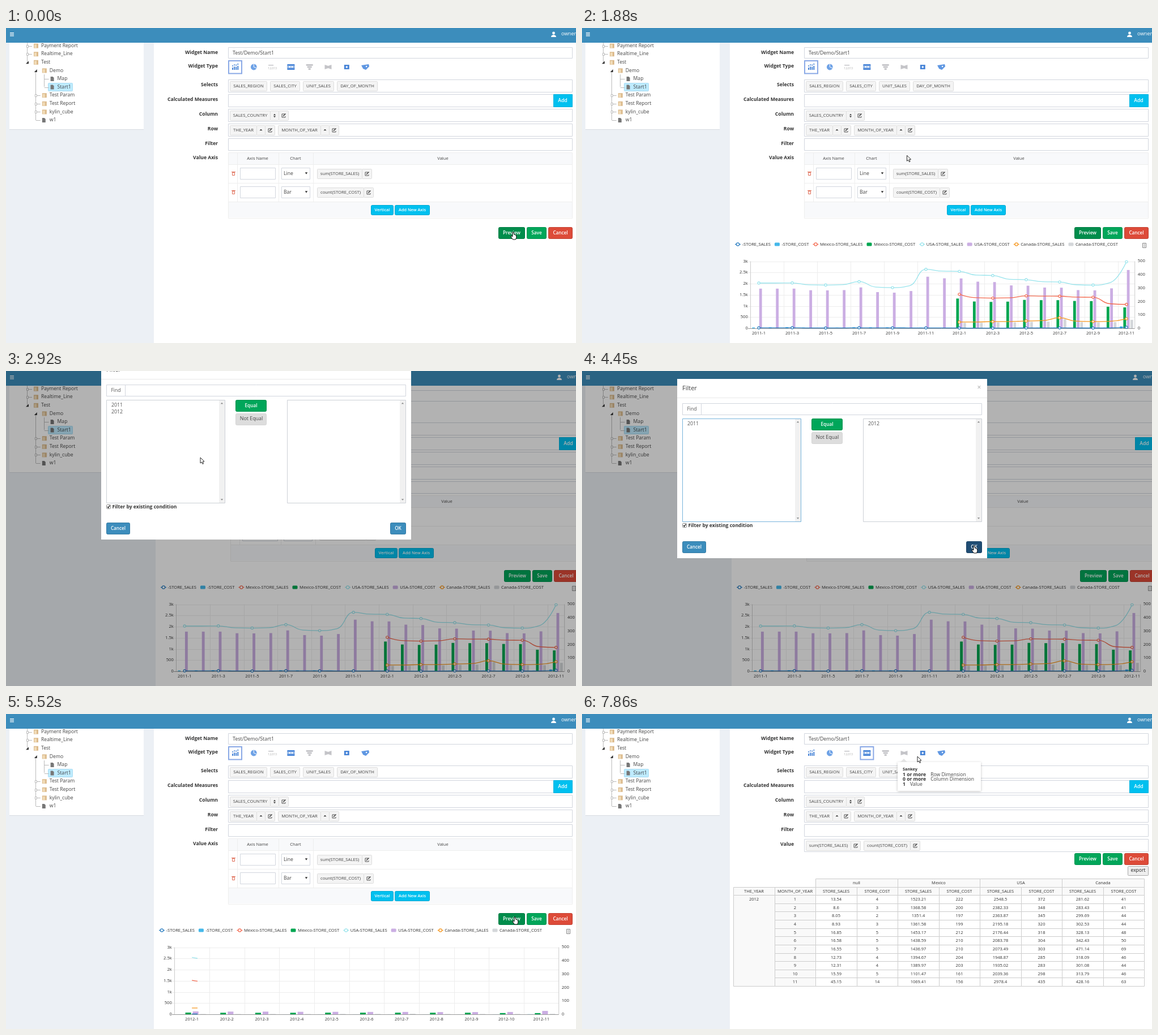
An HTML page with a canvas that plays this animation: 1006 by 557 pixels, repeating every 8000 ms.

```html
<!DOCTYPE html>
<html lang="en">
<head>
<meta charset="utf-8">
<title>Widget editor</title>
<style>
html, body { margin: 0; width: 100%; height: 100%; overflow: hidden; }
canvas { display: block; }
</style>
</head>
<body>
<canvas id="stage" width="1006" height="557"></canvas>
<script>
const g = document.getElementById('stage').getContext('2d');
const GREEN = '#00a65a', RED = '#dd4b39', CYAN = '#00c0ef', BLUE = '#3c8dbc', ICON = '#4a86d8', PALE = '#c4c4c8';

// The picture advances in beats; everything below is timed by beat number.
const BEAT = 261, LEAD = 520;
const CHART = 1, WIDE = 8, MODAL = 9, PICKED = 12, CONFIRM = 15, CLOSED = 16, NARROW = 17, REDRAW = 19, BLUR = 26, TABLE = 27, TIP = 28;

// beat, x, y
const PATH = [[2, 896, 367], [6, 466, 178], [8, 466, 178], [MODAL, 343, 153], [11, 200, 106], [CONFIRM, 693, 315],
  [NARROW, 899, 365], [21, 899, 365], [24, 502, 73], [TABLE, 502, 73], [TIP, 592, 75]];

// sales of every second month up to 2012-11; cost is a share of sales
const GROUPS = [
  { name: 'null', line: '#2a7dc0', bar: '#45b8ea', share: .3, keys: [20, 26, 14, 24, 20, 18, 13.54, 8.05, 16.85, 16.55, 12.31, 45.15] },
  { name: 'Mexico', line: '#f3694f', bar: '#00a651', share: .146, keys: [1523.21, 1351.4, 1453.17, 1436.97, 1389.97, 1069.41] },
  { name: 'USA', line: '#98e4ec', bar: '#cbaee3', share: .146,
    keys: [2025, 2030, 1935, 2090, 1820, 2640, 2548.5, 2363.87, 2176.44, 2073.49, 1935.02, 2978.4] },
  { name: 'Canada', line: '#f5961d', bar: '#d4d7da', share: .146, keys: [281.62, 299.69, 328.13, 471.14, 301.08, 428.16] }];
const MONTHS = 23;

// months between two keys stay near the lower one
function sales(keys, month) {
  const k = (month - MONTHS + keys.length * 2 - 1) / 2;
  if (k < 0) return null;
  const a = keys[Math.floor(k)], b = keys[Math.ceil(k)];
  return +(Math.min(a, b) * .9 + Math.max(a, b) * .1).toFixed(2);
}
const ROWS = Array.from({ length: MONTHS }, (_, i) => GROUPS.map(({ keys, share }) => {
  const s = sales(keys, i);
  return { sales: s, cost: Math.round(s * share) };
}));
const Y2012 = ROWS.slice(12);

const clamp = (v, a, b) => Math.max(a, Math.min(b, v));

function measure(s, size, weight = 400) {
  g.font = `${weight} ${size}px "Open Sans", "Noto Sans", sans-serif`;
  return g.measureText(s).width;
}
function text(s, x, y, size = 8.6, color = '#444', align = 'left', weight = 400) {
  const w = measure(s, size, weight);
  g.fillStyle = color;
  g.textAlign = align;
  g.textBaseline = 'middle';
  g.fillText(s, x, y);
  return w;
}
function rect(x, y, w, h, fill) {
  g.fillStyle = fill;
  g.fillRect(x, y, w, h);
}
function box(x, y, w, h, fill = '#fff', stroke = '#d2d6de', r = 0) {
  g.beginPath();
  g.roundRect(x + .5, y + .5, w - 1, h - 1, r);
  g.fillStyle = fill;
  g.fill();
  g.lineWidth = 1;
  g.strokeStyle = stroke;
  g.stroke();
}
function poly(x, y, pts, fill, stroke, width = 1) {
  g.beginPath();
  pts.forEach(([a, b]) => g.lineTo(x + a, y + b));
  if (fill) { g.closePath(); g.fillStyle = fill; g.fill(); }
  if (stroke) { g.lineWidth = width; g.strokeStyle = stroke; g.stroke(); }
}
function dot(x, y, r, fill, stroke, width = 1.2) {
  g.beginPath();
  g.arc(x, y, r, 0, 7);
  g.fillStyle = fill;
  g.fill();
  if (stroke) { g.lineWidth = width; g.strokeStyle = stroke; g.stroke(); }
}
const line = (x1, y1, x2, y2, color, width) => poly(0, 0, [[x1, y1], [x2, y2]], null, color, width);
const tri = (x, y, w, h, color = '#333') => poly(x, y, [[-w, h], [w, h], [0, -h]], color);

function button(s, x, y, w, h, color, size = 8.2) {
  box(x, y, w, h, color, color, 2);
  box(x, y, w, h, 'transparent', 'rgba(0,0,0,.12)', 2);
  text(s, x + w / 2, y + h / 2, size, '#fff', 'center', 600);
}
function pencil(x, y) {
  poly(x, y, [[2, -3], [-3, -3], [-3, 3], [3, 3], [3, 1]], null, '#555');
  line(x - 1, y + 1, x + 3.5, y - 3.5, '#444', 1.5);
}
// Each item is "NAME" or "NAME:kinds" with s sortable, u ascending, e editable.
function tags(x, y, items, hot) {
  for (const item of items) {
    const [name, kinds = ''] = item.split(':'), w = Math.round(measure(name, 7.7)) + 12;
    box(x, y, w, 18, '#f4f4f4', '#ddd', 1);
    text(name, x + w / 2, y + 9, 7.7, '#444', 'center');
    x += w - 1;
    for (const k of kinds) {
      const cell = k == 'e' ? 18 : 16, cx = x + cell / 2, cy = y + 9, active = hot == name && k == 'e';
      box(x, y, cell, 18, active ? '#dcdcdc' : '#f4f4f4', active ? '#999' : '#ddd', 1);
      if (k == 'e') pencil(cx, cy);
      if (k == 'u') tri(cx, cy - 1, 2.5, 1.3);
      if (k == 's') [-1, 1].forEach(d => tri(cx, cy + 2 * d, 2, -1.3 * d));
      x += cell - 1;
    }
    x += 6;
  }
}

function header(shift) {
  rect(0, 0, 1006, 26, BLUE);
  for (let i = 0; i < 3; i++) rect(7, 8 + i * 2.6, 7, 1.2, '#fff');
  dot(966.5 + shift, 9, 2.4, '#fff');
  g.beginPath();
  g.ellipse(966.5 + shift, 16, 4.5, 4, 0, Math.PI, 0);
  g.fill();
  text('owner', 980 + shift, 11, 8.9, '#fff');
}

// indent, kind (c collapsed, o open, f file), name
const TREE = ['0c Payment Report', '0c Realtime_Line', '0o Test', '1o Demo', '2f Map', '2f Start1',
  '1c Test Param', '1c Test Report', '1c kylin_cube', '1f w1'];
function tree(wide) {
  const w = 237 + 3 * wide;
  rect(0, 26, w + 24, 531, '#ecf0f5');
  rect(6, 26, w, 154, '#fff');
  rect(6, 179, w, 1, '#d8dce2');
  line(37.5, 26, 37.5, 60, '#bbb');
  line(52.5, 75, 52.5, 163, '#bbb');
  line(67.5, 82, 67.5, 104, '#bbb');
  TREE.forEach((item, i) => {
    const level = +item[0], kind = item[1], name = item.slice(3);
    const y = 31.6 + i * 14.6, row = Math.round(y), x = 38 + level * 14.8, ix = x + 15;
    if (name == 'Start1') box(74, row - 8, 44, 15, '#beebff', '#a9dcf2', 1);
    if (kind == 'o') poly(x, y, [[2, -2.5], [2, 2.5], [-3, 2.5]], '#333');
    else line(x, row + .5, x + 8, row + .5, '#bbb');
    if (kind == 'c') box(x - 2, row - 2, 4, 5, '#fff', '#bbb');
    if (kind == 'f') poly(ix - 1, y, [[-3, -4], [1, -4], [3, -2], [3, 4], [-3, 4]], '#777');
    else {
      rect(ix - 4, y - 4, 8, 8, '#dcbb8d');
      rect(ix - 3, y - 2.5, 4, 6, '#f1dcb8');
    }
    text(name, x + 24 - (level == 2 ? 1 : 0), y);
  });
}

function typeIcons(left, picked) {
  const x = i => left + 12.5 + i * 32.8, y = 69;
  g.lineWidth = 2;
  g.strokeStyle = '#8aa9e6';
  g.strokeRect(x(picked) - 11.5, 58, 23, 22.5);
  for (let i = 0; i < 4; i++) {
    const bx = x(0) - 5.5 + i * 3.1, h = 4 + i * .7 + i % 2;
    rect(bx, y + 5 - h, 2, h, ICON);
    dot(bx + 1, y + 2 - h, 1.1, ICON);
  }
  dot(x(1), y, 5.4, '#6ea2e6');
  poly(x(1), y, [[0, -5.4], [0, 0], [5, 2]], null, '#fff');
  rect(x(2) - 7, y - 4, 9, 1.5, PALE);
  text('12,013', x(2), y + 3, 5, '#aaa', 'center');
  rect(x(3) - 6.5, y - 5, 13, 10, ICON);
  rect(x(3) - 5.5, y - 2, 11, 3.5, '#fff');
  for (let i = -4; i < 6; i += 4) rect(x(3) + i - 1, y - 1, 2, 1.5, ICON);
  for (let i = 0; i < 3; i++) rect(x(4) - 6 + i * 2, y - 5 + i * 3.6, 12 - i * 4, 2.8, PALE);
  poly(x(5), y, [[-6, -4], [0, -2], [6, -4], [6, 4], [0, 2], [-6, 4]], PALE);
  rect(x(6) - 4.5, y - 4, 9, 8, ICON);
  dot(x(6), y, 1.7, '#fff');
  poly(x(7), y, [[-7, -3], [6, -5], [7, -1], [1, 5], [-4, 3]], '#5f97e2');
  dot(x(7) + 2, y - 1, 1.2, '#fff');
}

function form(beat, wide) {
  const x = 392 + 4 * wide, right = 1000 + 10 * wide, w = right - x, table = beat >= TABLE;
  const label = (s, y) => text(s, x - 18, y, 8.6, '#333', 'right', 700);
  label('Widget Name', 44);
  label('Widget Type', 68);
  box(x, 34, w, 20);
  text('Test/Demo/Start1', x + 8, 44.5, 8.9);
  typeIcons(x, table ? 3 : 0);

  const fields = [['Selects', 'SALES_REGION', 'SALES_CITY', 'UNIT_SALES', 'DAY_OF_MONTH'], ['Calculated Measures'],
    ['Column', 'SALES_COUNTRY:se'], ['Row', 'THE_YEAR:ue', 'MONTH_OF_YEAR:ue'], ['Filter']];
  if (table) fields.push(['Value', 'sum(STORE_SALES):e', 'count(STORE_COST):e']);
  const hot = beat >= 6 && beat < CLOSED ? 'THE_YEAR' : '';
  fields.forEach(([name, ...items], i) => {
    const y = 91 + i * 26;
    label(name, y + 10);
    box(x, y, w, i == 4 ? 22 : 23);
    tags(x + 3, y + 3, items, hot);
  });
  box(right - 34, 117, 34, 23, CYAN, '#00b2de');
  text('Add', right - 17.5, 128.5, 8.6, '#fff', 'center', 600);
  if (!table) {
    label('Value Axis', 230);
    axes(x, w);
  }

  const y = table ? 246 : 352, focus = beat < WIDE || (beat >= NARROW && beat < BLUR);
  button('Preview', right - 131, y, 47, 21, beat == 0 ? '#007a42' : focus ? '#008d4c' : GREEN);
  button('Save', right - 81, y, 35, 21, GREEN);
  button('Cancel', right - 43, y, 43, 21, RED);
}

function axes(x, w) {
  box(x, 220, w, 117, '#fff', '#eee');
  [221, 307].forEach(y => rect(x + 1, y, w - 2, 28, '#f8f9fb'));
  rect(x + 1, 241, w - 2, 66, '#fff');
  [241, 274, 307].forEach(y => rect(x, y, w, 1, '#eee'));
  [16, 89, 150].forEach(c => rect(x + c, 220, 1, 87, '#eee'));
  text('Axis Name', x + 52, 231, 7.6, '#444', 'center');
  text('Chart', x + 119, 231, 7.6, '#444', 'center');
  text('Value', x + 75 + w / 2, 231, 7.6, '#444', 'center');
  [['Line', 'sum(STORE_SALES):e'], ['Bar', 'count(STORE_COST):e']].forEach(([kind, item], i) => {
    const y = 257 + i * 33;
    box(x + 7, y - 2, 5, 6, '#fff', '#e0705a');
    rect(x + 6, y - 3, 7, 1, '#e0705a');
    box(x + 21, y - 10, 63, 21);
    box(x + 94, y - 10, 51, 21);
    text(kind, x + 98, y + .5);
    tri(x + 138, y, 2.2, -1.7);
    tags(x + 157, y - 8, [item]);
  });
  const mid = Math.round(x + w / 2);
  button('Vertical', mid - 52, 313, 40, 18, CYAN, 7.4);
  button('Add New Axis', mid - 10, 313, 62, 18, CYAN, 7.3);
}

function legend(x) {
  const y = 382.5;
  GROUPS.forEach((group, i) => ['SALES', 'COST'].forEach(kind => {
    if (kind == 'SALES') {
      line(x, y, x + 10, y, group.line, 1.3);
      dot(x + 5, y, 2.6, '#fff', group.line);
    } else {
      g.beginPath();
      g.roundRect(x, y - 3, 9, 6, 1.5);
      g.fillStyle = group.bar;
      g.fill();
    }
    x += 19.5 + text(`${i ? group.name : ''}-STORE_${kind}`, x + 12.5, 383, 7.64, '#333');
  }));
}

// smooth curve, flat at every peak and dip
function curve(pts, band) {
  const tangent = i => {
    if (!i || i == pts.length - 1) return [0, 0];
    const a = pts[i].y - pts[i - 1].y, b = pts[i + 1].y - pts[i].y, m = Math.min(Math.abs(a), Math.abs(b), Math.abs(a + b) / 4);
    return [band / 2, a * b > 0 ? Math.sign(a) * m : 0];
  };
  g.beginPath();
  pts.forEach(({ x, y }, i) => {
    if (!i) return g.moveTo(x, y);
    const from = pts[i - 1], [ax, ay] = tangent(i - 1), [bx, by] = tangent(i);
    g.bezierCurveTo(from.x + ax, from.y + ay, x - bx, y - by, x, y);
  });
}

function chart(rows, p, left, right, iconX) {
  const base = 531, H = 118.5, band = (right - left) / rows.length, every = rows.length > 12 ? 2 : 1;
  const cx = i => left + (i + .5) * band, q = clamp(p / .41, 0, 1), grow = q * q * (3 - 2 * q);
  legend(left - 27.3);
  box(iconX - 3, 380, 7, 9, '#fff', '#888');
  for (let y = 382.5; y < 388; y += 2) line(iconX - 1, y, iconX + 2, y, '#999', .8);

  for (let i = 0; i <= 6; i++) {
    const y = Math.round(base - i * H / 6) + .5;
    line(left - 4, y, right, y, i ? '#ededed' : '#999');
    text(i < 2 ? i * 500 : i / 2 + 'k', left - 4.5, y, 7.6, '#333', 'right');
  }
  for (let i = 0; i <= 5; i++) text(i * 100, right + 5, base - i * H / 5, 7.6, '#333');
  for (let i = 0; i < rows.length; i += every) {
    const x = Math.round(left + i * band) + .5, month = i + MONTHS - rows.length;
    line(x, base - H, x, base, i ? '#ededed' : '#ccc');
    text(`${month < 12 ? 2011 : 2012}-${month % 12 + 1}`, cx(i), 540, 7.6, '#333', 'center');
  }
  line(right, base - H, right, base, '#ccc');

  const bw = band * .8 / 4.9;
  rows.forEach((row, i) => row.forEach(({ cost }, k) => {
    const h = cost / 500 * H * grow;
    rect(cx(i) - band * .4 + k * bw * 1.3, base - h, bw, h, GROUPS[k].bar);
  }));

  const series = GROUPS.map((_, k) => rows
    .map((row, i) => ({ x: cx(i), y: base - row[k].sales / 3000 * H, marked: i % every == 0, used: row[k].sales !== null }))
    .filter(pt => pt.used));
  g.save();
  g.beginPath();
  g.rect(left, 400, (right - left) * p, 140);
  g.clip();
  series.forEach((pts, k) => {
    curve(pts, band);
    g.lineWidth = 1.3;
    g.strokeStyle = GROUPS[k].line;
    g.stroke();
  });
  g.restore();
  if (p > .1) series.forEach((pts, k) => pts.forEach(pt => {
    if (pt.marked) dot(pt.x, pt.y, 2.1 * p, '#fff', GROUPS[k].line);
  }));
}

function grid() {
  const col = c => Math.round(267 + c * 72.5), row = r => Math.round(291 + r * 14.62);
  const cell = (s, c, r, head, span = 1, rows = 1) => {
    const x = col(c), y = row(r), w = col(c + span) - x;
    box(x, y, w + 1, row(r + rows) - y + 1, head ? '#f9f9f9' : '#fff', '#ccc');
    text(s, x + w / 2, y + 7.6, 7.5, '#333', 'center');
  };
  cell('THE_YEAR', 0, 1, true);
  cell('MONTH_OF_YEAR', 1, 1, true);
  cell('2012', 0, 2, true, 1, 11);
  Y2012.forEach((_, r) => cell(r + 1, 1, r + 2, true));
  GROUPS.forEach(({ name }, k) => {
    const c = 2 + k * 2;
    cell(name, c, 0, true, 2);
    cell('STORE_SALES', c, 1, true);
    cell('STORE_COST', c + 1, 1, true);
    Y2012.forEach((values, r) => {
      cell(values[k].sales, c, r + 2);
      cell(values[k].cost, c + 1, r + 2);
    });
  });
  box(963, 269, 37, 17, '#efefef', '#aaa', 1);
  text('export', 981.5, 277, 8.5, '#222', 'center');
}

function tooltip() {
  g.save();
  g.shadowColor = 'rgba(0,0,0,.25)';
  g.shadowBlur = 4;
  g.shadowOffsetY = 1;
  rect(557, 85, 147, 51, '#fff');
  g.restore();
  tri(568, 82, 6, 3, '#e4e4e4');
  text('Sankey', 566, 98, 7.3, '#333', 'left', 700);
  [['1 or more', 'Row Dimension'], ['0 or more', 'Column Dimension'], ['1', 'Value']].forEach(([n, s], i) => {
    const y = 107.5 + i * 8.7;
    text(s, 574 + text(n, 566, y, 8.6, '#333', 'left', 700), y);
  });
}

function modal(beat) {
  const moved = beat >= PICKED;
  rect(0, 0, 1006, 557, 'rgba(0,0,0,.3)');
  g.save();
  g.translate(0, Math.round(-33 * .2 ** (beat - MODAL)));
  rect(168, 14, 547, 317, '#fff');
  text('Filter', 177, 31, 11);
  text('×', 701, 29.5, 12, '#bbb', 'center', 600);
  rect(168, 47, 547, 1, '#e8e8e8');
  box(177, 57, 529, 21);
  box(177, 57, 34, 21);
  text('Find', 194, 67.5, 8.6, '#555', 'center');
  const list = (x, items, stroke) => {
    box(x, 84, 210, 183, '#fff', stroke);
    rect(x + 199, 85, 10, 181, '#f1f1f1');
    tri(x + 204, 90, 2.2, 1.2, '#888');
    tri(x + 204, 260.5, 2.2, -1.2, '#888');
    items.forEach((s, k) => text(s, x + 9, 94 + k * 12, 8.8, '#555'));
  };
  list(177, moved ? ['2011'] : ['2011', '2012'], moved ? '#78b4dc' : '#ccd0d6');
  list(496, moved ? ['2012'] : [], '#ccd0d6');
  button('Equal', 405, 84, 55, 21, GREEN);
  box(405, 108, 55, 21, '#ddd', '#d5d5d5', 2);
  text('Not Equal', 433, 118, 8.9, '#444', 'center');
  box(177, 269, 8, 8, '#fff', '#888', 1);
  poly(181, 273, [[-2, 0], [-.5, 1.8], [2.3, -2.3]], null, '#222', 1.3);
  text('Filter by existing condition', 187.5, 273.5, 8.6, '#333', 'left', 700);
  button('Cancel', 177, 301, 42, 21, BLUE);
  button('OK', 678, 301, 28, 21, beat >= CONFIRM ? '#204d74' : BLUE);
  g.restore();
}

function pointer(beat) {
  const b = clamp(beat, 2, TIP), n = PATH.findIndex(k => k[0] >= b), to = PATH[n], from = PATH[n - 1] || to;
  const f = n ? (b - from[0]) / (to[0] - from[0]) : 1;
  const x = from[1] + (to[1] - from[1]) * f, y = from[2] + (to[2] - from[2]) * f;
  const hand = beat <= 2 || beat == CONFIRM || (beat >= NARROW && beat <= 21);
  if (hand) poly(x, y, [[-2, -6], [0, -6], [.5, -2], [4, -1], [5, 3], [3.5, 7], [-1.5, 7], [-5, 2], [-4, .5], [-2, 2], [-2, -6]], '#fff', '#111');
  else poly(x, y, [[0, 0], [0, 10], [2.3, 8], [4, 11.5], [5.6, 10.8], [4.1, 7.3], [7, 7], [0, 0]], '#fff', '#111', .9);
}

function draw() {
  const beat = Math.floor((performance.now() % 8000 - LEAD) / BEAT);
  const wide = beat >= WIDE && beat < NARROW ? 1 : 0;
  const progress = start => clamp(.06 + .27 * (beat - start), 0, 1);
  rect(0, 0, 1006, 557, '#fff');
  tree(wide);
  header(10 * wide);
  form(beat, wide);
  if (beat >= TABLE) grid();
  else if (beat >= REDRAW) chart(Y2012, progress(REDRAW), 297.3, 975.7, 992);
  else if (beat >= CHART) {
    const left = 297.3 + 3 * wide, grown = wide && beat >= MODAL ? 7 : 0;
    chart(ROWS, progress(CHART), left, left + 678.4 + grown, left + 694.7 + grown);
  }
  if (beat >= MODAL && beat < CLOSED) modal(beat);
  if (beat >= TIP) tooltip();
  pointer(beat);
  requestAnimationFrame(draw);
}
draw();
</script>
</body>
</html>
```
